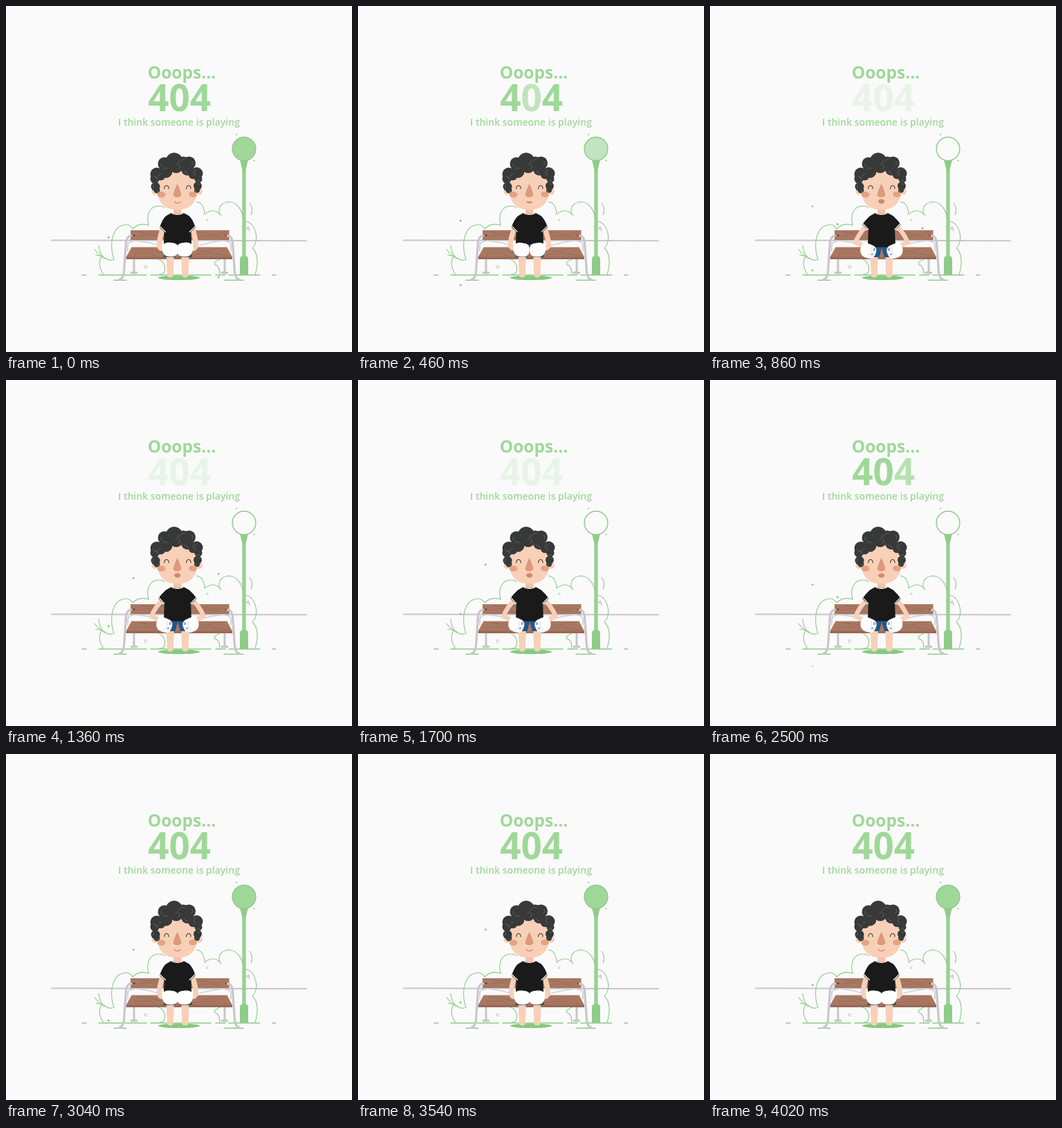
An HTML page with a canvas that plays this animation: 500 by 500 pixels, repeating every 4.06 s.

```html
<!DOCTYPE html>
<html lang="en">
<head>
<meta charset="utf-8">
<title>404</title>
<style>
html, body { margin: 0; width: 100%; height: 100%; overflow: hidden; background: #fafafa; }
canvas, svg { position: absolute; left: 0; top: 0; width: 500px; height: 500px; }
text { font-family: "Open Sans", "Noto Sans", sans-serif; fill: #9fd899; text-anchor: middle; }
</style>
</head>
<body>
<canvas id="stage"></canvas>
<svg viewBox="0 0 500 500">
  <text x="253.9" y="105.2" font-size="24.5" font-weight="700">Ooops...</text>
  <text x="250.6" y="152" font-size="53" font-weight="700"><tspan class="digit">4</tspan><tspan class="digit">0</tspan><tspan class="digit">4</tspan></text>
  <text x="250" y="173" font-size="14" font-weight="600">I think someone is playing</text>
</svg>
<script>
const LOOP = 4060;
const GREEN = '#8fcc89', LIGHT = '#a1d79b', GREY = '#c9c6ca', SKIN = '#f8d0b7',
      WOOD = '#a97862', GRAIN = '#91634f', HAIR = '#383a39', BLACK = '#191a19';

const canvas = document.getElementById('stage');
const ctx = canvas.getContext('2d');
const digits = document.querySelectorAll('.digit');
const ratio = window.devicePixelRatio || 1;
canvas.width = canvas.height = 500 * ratio;
ctx.scale(ratio, ratio);
ctx.lineCap = ctx.lineJoin = 'round';

const clamp = v => Math.max(0, Math.min(1, v));
const ramp = (t, a, b) => clamp((t - a) / (b - a));
const smooth = p => p * p * (3 - 2 * p);
const mix = (a, b, p) => a + (b - a) * p;

function fill(d, color) {
  ctx.fillStyle = color;
  ctx.fill(new Path2D(d));
}
function line(d, color, width = 1.1) {
  ctx.strokeStyle = color;
  ctx.lineWidth = width;
  ctx.stroke(new Path2D(d));
}
function oval(x, y, rx, ry, color) {
  ctx.fillStyle = color;
  ctx.beginPath();
  ctx.ellipse(x, y, rx, ry, 0, 0, 7);
  ctx.fill();
}
// Draws a part twice, the second time mirrored about x
function mirror(x, draw) {
  draw();
  ctx.save();
  ctx.translate(2 * x, 0);
  ctx.scale(-1, 1);
  draw();
  ctx.restore();
}

function park() {
  line('M66 338.4 L434 339.2', GREY, 2);
  line('M141 388C134 379 133 366 140 361M148 367Q153 368 156 366C150 349 152 329 162 320Q176 311 183 322Q193 312 206 317', GREEN);
  line('M206 317C202 301 208 289 221 289Q227 289 229 292', GREEN);
  line('M275 283Q286 284 287 301Q301 290 311 303', GREEN);
  line('M309 301C305 289 314 283 323 283C336 284 343 299 343 311', GREEN);
  line('M347 311C361 315 367 338 356 350C364 356 365 372 360 388', GREEN);
  line('M221 366Q232 372 229 384Q227 388 221 388M311 365Q298 371 302 374Q309 375 309 388', GREEN);
  line('M352 285Q358 293 354 302M348 320L349 323M350 319L352 325', GREEN);
  line('M134 346Q135 358 142 365M128 352Q136 363 149 367M130 360Q139 361 146 366', GREEN);
  line('M200 375L201 379M203 375L203 379M289 309L292 307M290 310L292 310', '#a9c9a4', .9);
  line('M110 388.7H116M134 388.7H203M209 388.7H296M303 388.7H317M322 388.7H367M385 388.7H390M156 396.2H174M315 396.2H343', GREEN, 1.4);
  oval(333, 185.7, 1, 1, GREEN);
  oval(358.5, 223.5, 1.2, 1.1, GREEN);
}

function lamp(light) {
  ctx.globalAlpha = light;
  oval(344, 206.5, 17, 17, LIGHT);
  ctx.globalAlpha = 1;
  ctx.strokeStyle = GREEN;
  ctx.lineWidth = 1.5;
  ctx.beginPath();
  ctx.arc(344, 206.5, 16.9, 0, 7);
  ctx.stroke();
  fill('M338 222Q344 225 350 222L346.6 236V365H341.4V236Z', GREEN);
  line('M344 239V360', '#a8d8a2', 1.2);
  fill('M338 388V366Q338 361 344 361Q350 361 350 366V388Z', GREEN);
}

// x, height and time of one known point, speed in px/ms, heights of start and end
const dots = [
  [148, 334, 0, .052, 418, 279],
  [148, 403, 460, .0526, 418, 279],
  [148, 385, 3040, .0525, 418, 279],
  [184, 315, 860, .0577, 396, 229],
  [184, 282.5, 3040, .0577, 396, 229],
  [307, 392, 0, .0824, 405, 255]
];
function drawDots(t) {
  for (const [x, y0, t0, v, low, top] of dots) {
    const y = y0 - v * (t - t0);
    ctx.globalAlpha = ramp(y, top, top + 14) * ramp(y, low, low - 13);
    oval(x + .2, y + .2, 1.5, 1.5, '#8cc587');
  }
  ctx.globalAlpha = 1;
}

function bench() {
  mirror(250.5, () => {
    line('M185 365V385', GREY, 3);
    line('M181.5 385.5H188.5', GREY, 3.6);
    line('M186 339Q205 341 222 346', '#d3d0d4', 1.3);
  });
  fill('M180 324H322.5V338H180Z', WOOD);
  line('M196 327Q220 329 229 326M190 333Q205 328 218 333T228 334M271 329Q286 326 296 330T316 327M272 335Q290 330 311 335', GRAIN, .6);
  line('M180 337.5H322', '#946752', .8);
  oval(185, 331.5, 1.3, 1.3, '#4f3d38');
  oval(318, 331.5, 1.3, 1.3, '#4f3d38');
  fill('M181.5 348.5H319.5L327 363H173.5Z', WOOD);
  line('M190 352Q205 350 218 355T238 353M186 359Q201 353 215 360M272 352Q286 357 299 352T315 354M270 360Q290 355 307 359T320 359', GRAIN, .6);
  fill('M173.5 362.5H327V366H173.5Z', '#996955');
  mirror(250.5, () => {
    line('M181 332Q174 332 173.3 344L170.5 384Q169.5 394 164 395.3', GREY, 3.2);
    line('M176 354V347Q176 340 184 340', '#d0cdd1', 1.6);
  });
}

const curls = [
  [243, 224, 12], [229, 228, 9.5], [256, 227, 9.5], [264.5, 227, 9.5], [218, 243, 9.5],
  [275.5, 242, 9], [215, 250, 6.5], [278, 250, 5.5], [216, 261, 6.5], [277, 260, 6],
  [218, 266, 4.5], [276, 266, 4], [231, 239, 9.5], [246, 232, 9.5], [262, 236, 9], [224, 246, 6], [270, 244, 6]
];
function head(open) {
  fill('M242 290H253.5V303H242Z', '#f3c3a8');
  oval(215, 268, 4.5, 5, SKIN);
  oval(279.5, 268, 4.5, 5, SKIN);
  fill('M218 262C218 238 228 231 247.5 231S277 238 277 262C277 284 266 294.5 247.5 294.5S218 284 218 262Z', SKIN);
  for (const [x, y, r] of curls) oval(x, y, r, r, HAIR);
  ctx.strokeStyle = '#777a78';
  ctx.lineWidth = .6;
  curls.forEach(([x, y, r], i) => {
    ctx.beginPath();
    ctx.arc(x, y, r * .55, i * 1.9, i * 1.9 + 1.3);
    ctx.stroke();
  });
  oval(224.5, 272.5, 6, 4.2, '#e4a385');
  oval(270, 272.2, 6, 4.2, '#e4a385');
  line('M228.8 264Q229 259.5 232 259.5T235.2 264M260.6 264Q261 259.5 264 259.5T267 264', '#4b403b', 1.2);
  fill('M247.5 257C244 264 241.5 271 241.8 274Q247.5 279 253.2 274C253.5 271 251 264 247.5 257Z', '#da9a7b');
  const top = mix(284.5, 278, open), low = mix(286, 286.8, open);
  const edge = mix(282.8, 282.2, open);
  fill(`M243 ${edge}C244 ${top} 251 ${top} 252.3 ${edge}C252 ${low} 243.5 ${low} 243 ${edge}Z`, '#cf8a6f');
  ctx.globalAlpha = 1 - open;
  line('M243.4 282.6Q247.7 287 252 282.6', '#cf8a6f', 1.1);
  ctx.globalAlpha = 1;
}

function arm(p) {
  const elbow = mix(221.5, 210, p), low = mix(347, 341.5, p);
  line(`M${mix(227, 224, p)} 320Q${mix(221.5, 215.5, p)} ${mix(335, 329, p)} ${elbow} ${low}L${mix(224, 218, p)} ${mix(350, 345, p)}`, SKIN, mix(7.5, 6.5, p));
}

function sleeve(p) {
  const x = mix(222, 220, p), y = mix(320, 315.5, p);
  const u = mix(230.5, 228.8, p), v = mix(328, 324.5, p);
  fill(`M240 300L231 303.5Q226 308 ${x} ${y}L${u} ${v}L240 318Z`, BLACK);
  line(`M${x + .9} ${y - 1}L${u} ${v - 1.5}`, '#fff', 1.2);
}

function glove(p) {
  ctx.save();
  ctx.translate(mix(236.8, 228.2, p), mix(351.8, 353.5, p));
  ctx.rotate(.35 * p);
  fill('M-11.5 -2C-12 -9 -4 -11 3 -9.5C10 -9.5 12.5 -5 12 1C12 9 7 10.5 1 10.5C-7 11 -11 6 -11.5 -2Z', '#fff');
  line('M-8 7Q0 12 9 7', '#e7e7e8', .8);
  ctx.globalAlpha = p;
  fill('M6 -6L9 -7L10 -3L7 -2ZM6 2L9 1L9 4L6 5Z', '#a3adb2');
  line('M3 -6L5 0L2 7', '#d5dade', .9);
  ctx.restore();
}

function boy(p, open) {
  oval(250, 392.8, 30, 3.3, '#84c97f');
  fill('M231.5 359H243L241.7 390Q241 392.5 237.3 392.5T233 390Z', SKIN);
  fill('M253 359H264.5L263.5 390Q262.5 392.5 259 392.5T254.5 390Z', SKIN);
  fill('M229 344H267.5L269 363H252L248.2 350L244.5 363H227.5Z', p > .35 ? '#1e588a' : '#465057');
  fill('M246 362.5L248.2 350L250.7 362.5Z', '#b57258');
  mirror(247.9, () => arm(p));
  head(open);
  const hem = mix(344, 348.5, p);
  fill(`M239 299Q247.8 303 256.5 299L264 303L267 318L268 ${hem}H228L229 318L232 303Z`, BLACK);
  mirror(247.9, () => sleeve(p));
  line('M239.5 299.7Q247.8 303.4 256 299.7', '#fff', 1);
  mirror(247.9, () => glove(p));
}

function draw(t) {
  const light = t < 1500 ? 1 - ramp(t, 270, 760) : ramp(t, 2720, 2990);
  const back = 1 - smooth(ramp(t, 2450, 2950));
  const pose = smooth(ramp(t, 360, 820)) * back;
  const open = smooth(ramp(t, 280, 780)) * back;
  const off = [470, 300, 470], on = [1700, 2040, 2290];
  digits.forEach((d, i) => {
    const shown = t < 1500 ? 1 - ramp(t, off[i], off[i] + 370) : ramp(t, on[i], on[i] + 310);
    d.setAttribute('fill-opacity', mix(.19, 1, shown));
  });
  ctx.clearRect(0, 0, 500, 500);
  park();
  drawDots(t);
  lamp(light);
  bench();
  boy(pose, open);
}

function tick() {
  draw(performance.now() % LOOP);
  requestAnimationFrame(tick);
}
tick();
</script>
</body>
</html>
```
